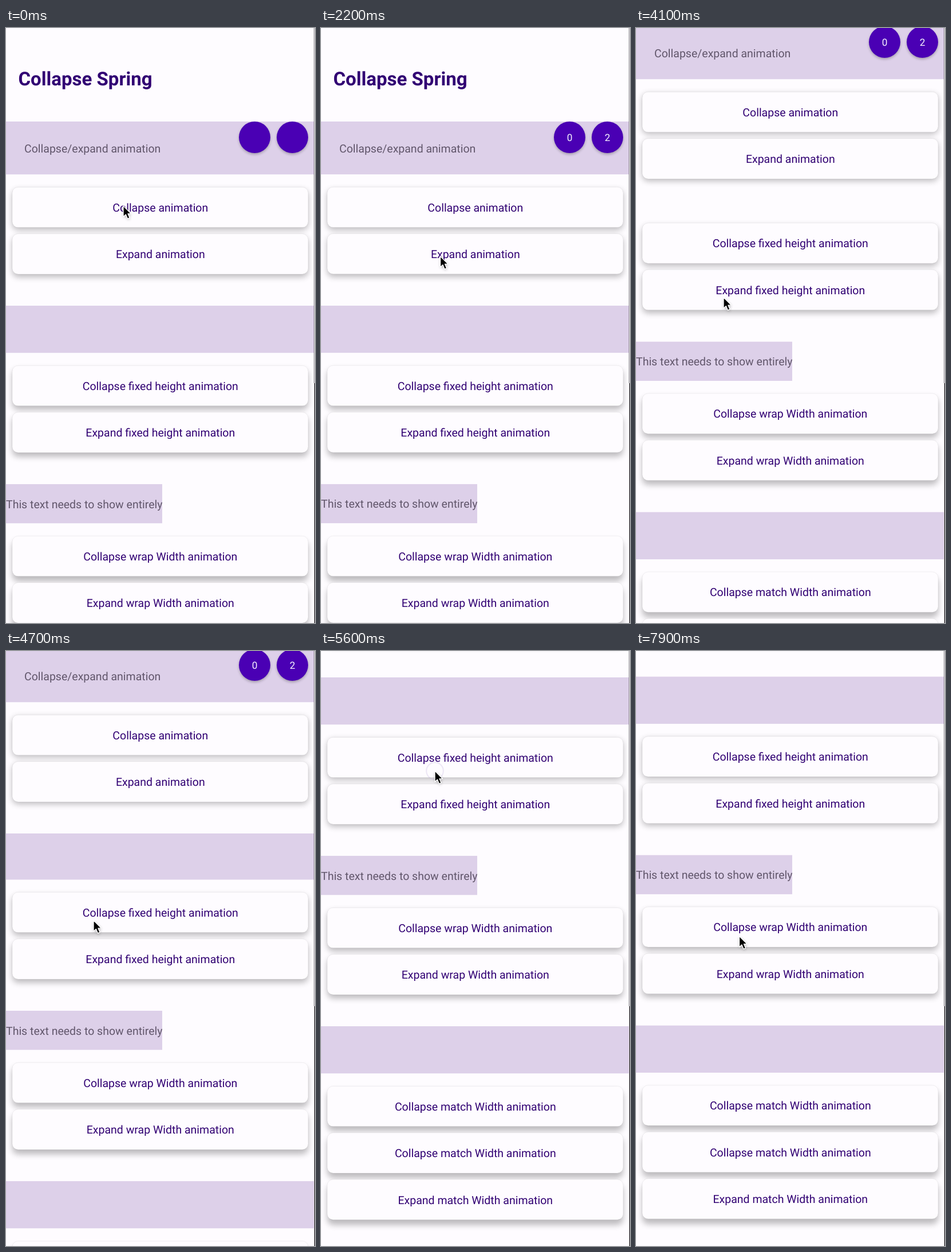
Write an HTML page that moves like this. It is 540 by 1037 pixels and loops after 8000 ms.

```html
<!DOCTYPE html>
<html lang="en">
<head>
<meta charset="utf-8">
<title>Collapse Spring</title>
<style>
  html, body { margin: 0; width: 100%; height: 100%; overflow: hidden; background: #fefcff; }
  svg { display: block; width: 100%; height: 100%; }
  text { font: 19.5px Roboto, sans-serif; text-rendering: geometricPrecision; }
  .title { font-size: 33px; font-weight: 700; fill: #310073; }
  .label { fill: #310073; text-anchor: middle; }
  .note { fill: #61566b; }
  .count { font-size: 17.2px; fill: #f8f3ff; text-anchor: middle; }
  .panel { fill: #ddd0e9; }
</style>
</head>
<body>
<svg viewBox="0 0 540 1037">
  <defs>
    <filter id="soft" x="-10%" y="-50%" width="120%" height="200%"><feGaussianBlur stdDeviation="5.2"/></filter>
    <filter id="small" x="-50%" y="-50%" width="200%" height="200%"><feGaussianBlur stdDeviation="2.5"/></filter>
    <clipPath id="screen"><rect width="538" height="1037"/></clipPath>
    <path id="arrow" d="M0 0V19L4.4 15L7.4 22.3L11 20.8L8 13.7H13.7Z"/>
  </defs>
  <rect width="540" height="1037" fill="#fefcff"/>
  <g clip-path="url(#screen)"><g id="page"></g></g>
  <rect x="538" width="1" height="619" fill="#77747a"/>
  <rect x="538.8" y="619" width="1.2" height="418" fill="#151316"/>
  <circle id="touch" r="14.8" fill="#fff" fill-opacity=".5" stroke="#c3b2dd" stroke-width="2"/>
  <g id="cursor">
    <use href="#arrow" x=".5" y="2" opacity=".3" filter="url(#small)"/>
    <use href="#arrow" stroke="#fff" stroke-width="1.3" stroke-linejoin="round"/>
  </g>
</svg>
<script>
const LOOP = 8000, STEP = 100;
const TOP = 163, BUTTON_H = 70.2, PITCH = 81.3, PAD = 22, GAP = 55;
const byId = id => document.getElementById(id);
const page = byId('page');

function add(parent, tag, attrs, text = '') {
  const el = document.createElementNS('http://www.w3.org/2000/svg', tag);
  for (const key in attrs) el.setAttribute(key, attrs[key]);
  el.textContent = text;
  parent.append(el);
  return el;
}
const shift = (el, x, y) => el.setAttribute('transform', `translate(${x} ${y})`);

// Easing
const clamp = v => Math.max(0, Math.min(1, v));
const ramp = (t, from, to) => clamp((t - from) / (to - from));
const smooth = p => p * p * (3 - 2 * p);
const easeOut = p => 1 - (1 - p) ** 3;
const pulse = (t, from, to, rise, fall) => Math.min(ramp(t, from, from + rise), 1 - ramp(t, to, to + fall));
function spring(t, start) {
  const u = Math.max(0, t - start) * .014;
  return 1 - (1 + u) * Math.exp(-u);
}

// Page
function makeButton(label) {
  const box = { x: 11, width: 517, height: BUTTON_H, rx: 10 };
  const shadow = add(page, 'rect', { ...box, opacity: .26, filter: 'url(#soft)' });
  const group = add(page, 'g', {});
  add(group, 'rect', { ...box, fill: '#fefcff', stroke: '#000', 'stroke-opacity': .05 });
  const tint = add(group, 'rect', { ...box, fill: '#f0e7f8' });
  add(group, 'text', { x: 269.8, y: 42.5, class: 'label' }, label);
  return { shadow, group, tint };
}

function makeSection({ name, height, width = 538, note = '', noteX = 0, verbs = ['Collapse', 'Expand'] }, i) {
  const clip = add(add(page, 'clipPath', { id: 'fold' + i }), 'rect', { width });
  const panel = add(page, 'g', {});
  const content = add(panel, 'g', { 'clip-path': `url(#fold${i})` });
  add(content, 'rect', { width, height, class: 'panel' });
  add(content, 'text', { x: noteX, y: height / 2 + 7.4, class: 'note' }, note);
  return { height, clip, panel, buttons: verbs.map(verb => makeButton(`${verb} ${name}`)) };
}

function makeBadge(x) {
  add(page, 'circle', { cx: x, cy: 193, r: 27, opacity: .3, filter: 'url(#small)' });
  add(page, 'circle', { cx: x, cy: 190.5, r: 27.5, fill: '#4a00b4' });
  return add(page, 'text', { x, y: 197, class: 'count' });
}

add(page, 'text', { x: 21.5, y: 100, class: 'title' }, 'Collapse Spring');
const sections = [
  { name: 'animation', height: 92.4, note: 'Collapse/expand animation', noteX: 32 },
  { name: 'fixed height animation', height: 82.5 },
  { name: 'wrap Width animation', height: 68.5, width: 273, note: 'This text needs to show entirely' },
  { name: 'match Width animation', height: 82.5, verbs: ['Collapse', 'Collapse', 'Expand'] }
].map(makeSection);
const buttons = sections.flatMap(section => section.buttons);
const progressBadge = makeBadge(434.5), stateBadge = makeBadge(500.5);

// Gestures: four taps that fold and unfold, two drags that scroll
const collapseA = { from: 250, to: 400, button: 0 };
const expandA = { from: 1430, to: 1580, button: 1 };
const dragShort = { from: 2520, to: 2790 };
const collapseB = { from: 3250, to: 3400, button: 2 };
const expandB = { from: 4150, to: 4300, button: 3 };
const dragLong = { from: 5000, to: 5400, button: 2 };
const gestures = [collapseA, expandA, dragShort, collapseB, expandB, dragLong];

const START = [205, 310];
const moves = [
  { from: 1000, to: 1400, x: 210, y: 305.5 },
  { from: 1900, to: 2350, x: 208, y: 430 },
  { from: 2620, to: 2800, x: 201.5, y: 262 },
  { from: 2800, to: 3230, x: 153, y: 469.5 },
  { from: 5050, to: 5380, x: 199, y: 209 },
  { from: 6200, to: 7700, x: 180.5, y: 497 }
];

const cursorAt = t => moves.reduce(([x, y], m) => {
  const p = smooth(ramp(t, m.from, m.to));
  return [x + (m.x - x) * p, y + (m.y - y) * p];
}, START);
const scrollAt = t => 166 * smooth(ramp(t, 2640, 2810)) + 273.5 * easeOut(ramp(t, 5136, 5700));
const foldAt = (t, collapse, expand) => clamp(spring(t, collapse.to) - spring(t, expand.to));

function layOut(scroll, folds) {
  let y = TOP;
  sections.forEach((section, i) => {
    const height = section.height * (1 - (folds[i] || 0));
    section.clip.setAttribute('height', height);
    shift(section.panel, 0, y);
    y += height + PAD;
    section.buttons.forEach((button, n) => {
      const top = y + n * PITCH;
      shift(button.group, 0, top);
      shift(button.shadow, 0, top + 2.5 + Math.max(0, top - scroll) * .007);
    });
    y += (section.buttons.length - 1) * PITCH + BUTTON_H + GAP;
  });
  shift(page, 0, -scroll);
}

function showTouch(t) {
  const gesture = gestures.filter(g => g.from <= t).pop();
  byId('touch').setAttribute('opacity', gesture ? pulse(t, gesture.from, gesture.to, 80, 280) : 0);
  if (gesture) shift(byId('touch'), ...cursorAt(Math.min(t - 15, gesture.to)));
  buttons.forEach((button, i) => {
    const pressed = gesture && gesture.button === i;
    button.tint.setAttribute('opacity', pressed ? pulse(t, gesture.from + 110, gesture.from + 250, 60, 150) : 0);
  });
}

function render(t) {
  const foldA = foldAt(t, collapseA, expandA);
  layOut(scrollAt(t), [foldA, foldAt(t, collapseB, expandB)]);
  progressBadge.textContent = t > collapseA.to ? Math.round(foldA * 100) : '';
  stateBadge.textContent = t < 900 ? '' : t > expandA.to && foldA < .01 ? 2 : 1;
  showTouch(t);
  shift(byId('cursor'), ...cursorAt(t));
}

const begin = performance.now();
function tick() {
  const t = (performance.now() - begin) % LOOP;
  render(Math.floor(t / STEP) * STEP);
  requestAnimationFrame(tick);
}
tick();
</script>
</body>
</html>
```
